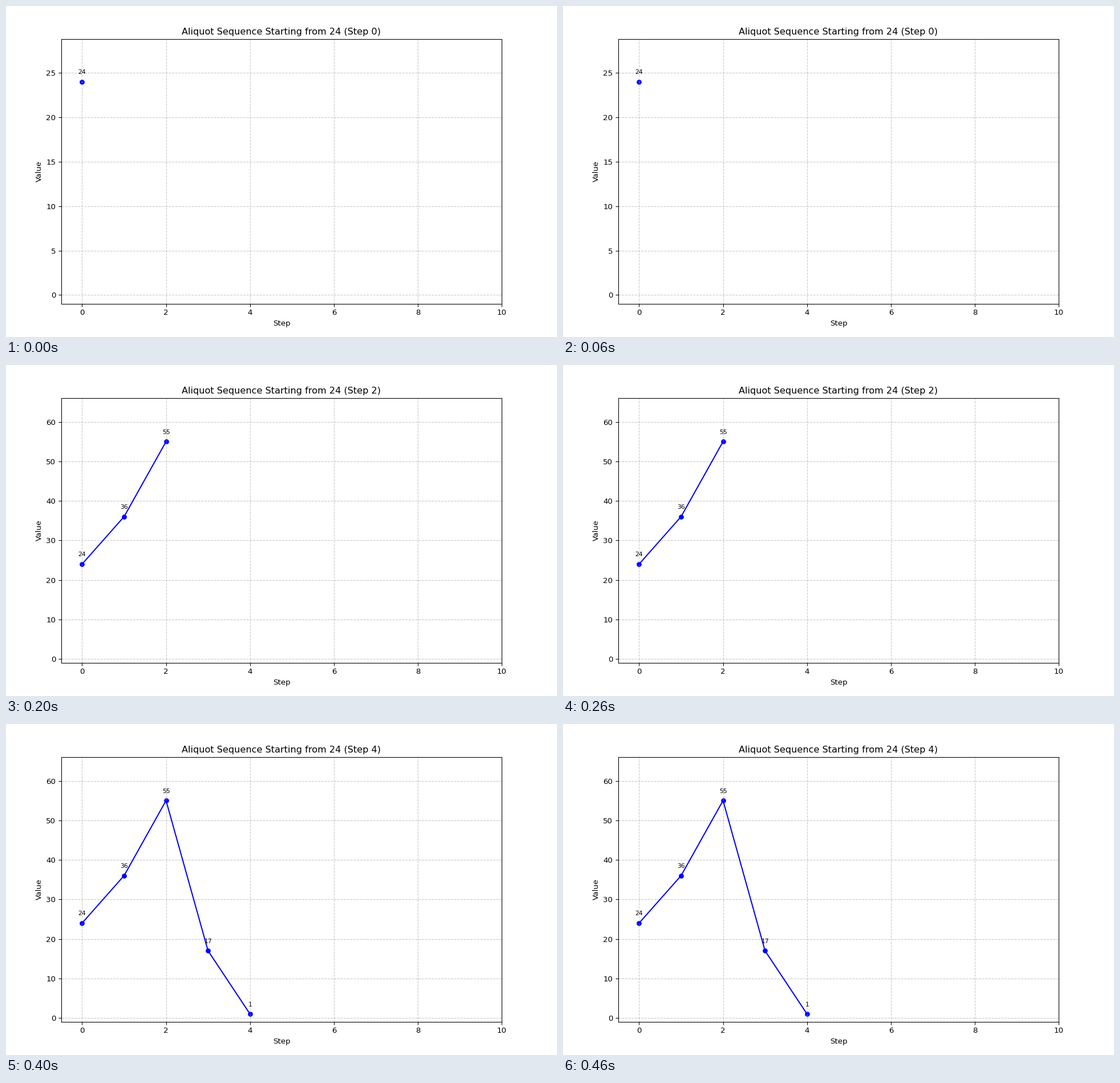
Recreate the animation shown at these times as a matplotlib script. Size 966 by 580 pixels, loop 0.5 s.

```python
import matplotlib.pyplot as plt
from matplotlib.animation import FuncAnimation

WIDTH, HEIGHT, DPI = 966, 580, 96.6
START = 24


def aliquot(n):
    """Sum of the proper divisors of n."""
    return sum(d for d in range(1, n // 2 + 1) if n % d == 0)


def sequence(n):
    values = [n]
    while values[-1] > 1:
        values.append(aliquot(values[-1]))
    return values


values = sequence(START)
fig = plt.figure(figsize=(WIDTH / DPI, HEIGHT / DPI), dpi=DPI)
ax = fig.add_axes([0.1, 0.1, 0.8, 0.8])


def draw(step):
    ax.clear()
    ys = values[:step + 1]
    xs = range(len(ys))

    # Dots sit under the grid, the line above it.
    ax.scatter(xs, ys, s=30, color="blue")
    ax.plot(xs, ys, color="blue")
    for x, y in zip(xs, ys):
        ax.annotate(str(y), (x, y), xytext=(0, 10), ha="center",
                    textcoords="offset points", fontsize=8)

    ax.set_xlim(-0.5, 10)
    ax.set_ylim(-1, max(ys) * 1.2)
    ax.grid(True, linestyle="--", alpha=0.7)
    ax.set_xlabel("Step")
    ax.set_ylabel("Value")
    ax.set_title(f"Aliquot Sequence Starting from {START} (Step {step})")
    return []


anim = FuncAnimation(fig, draw, frames=len(values), interval=100,
                     init_func=lambda: [], repeat=True, repeat_delay=0)
plt.show()
```
